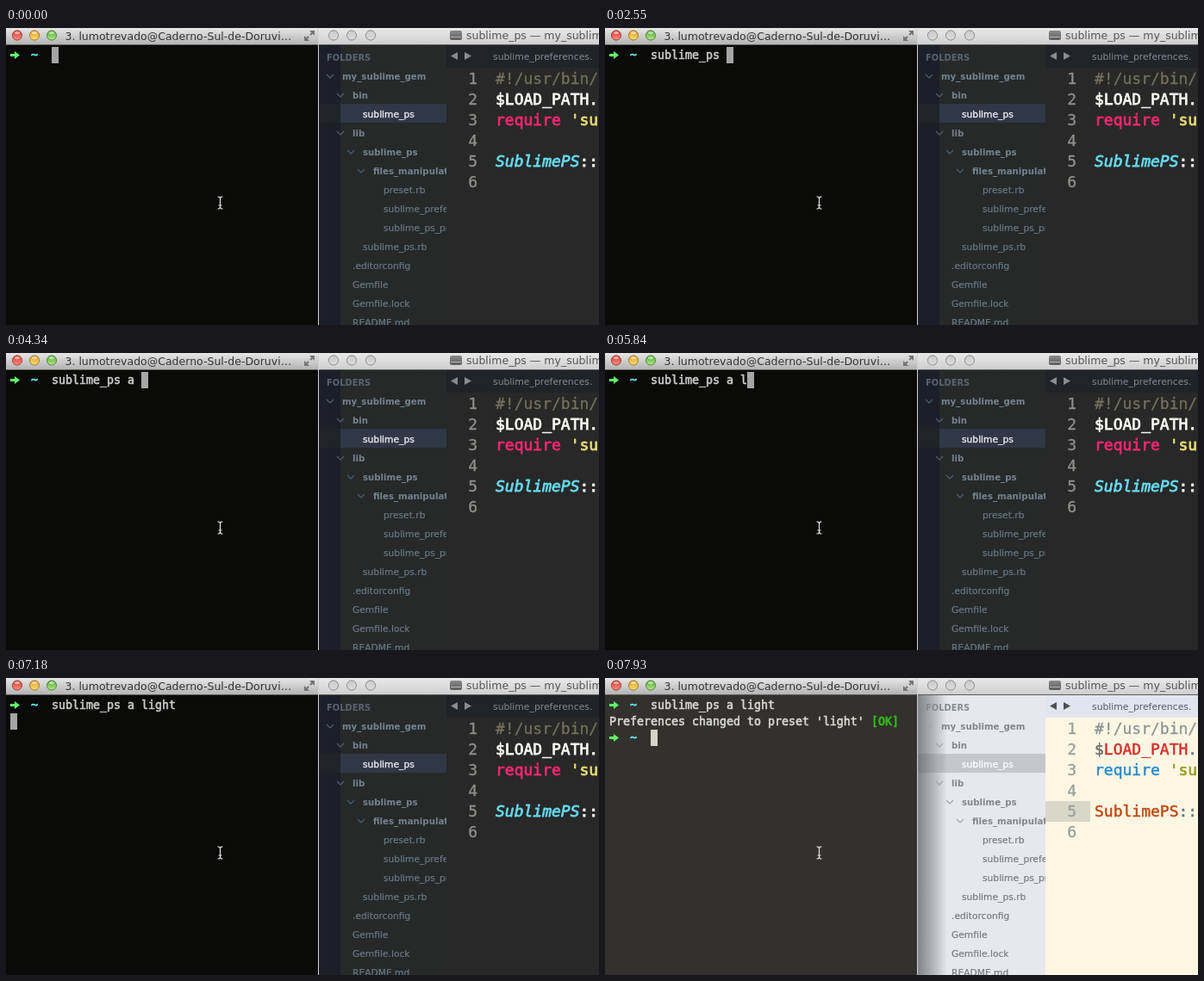
These frames come from a looping animation (688x345 px, 8 s). An HTML page with a canvas:

```html
<!DOCTYPE html>
<html lang="en">
<head>
<meta charset="utf-8">
<title>Preset switch</title>
<style>
  html, body { margin: 0; width: 100%; height: 100%; overflow: hidden; background: #0a0a08; }
  canvas { display: block; }
</style>
</head>
<body>
<canvas id="stage" width="688" height="345"></canvas>
<script>
const ctx = document.getElementById('stage').getContext('2d');
const W = 688, H = 345, LOOP = 8000;
const SANS = '"DejaVu Sans", sans-serif';
const MONO = '"DejaVu Sans Mono", monospace';
const TERM = '13.29px ' + MONO;
const CODE = '18px ' + MONO;
const COL = 8, ROW = 19;

const COMMAND = 'sublime_ps a light';
// [time, typed characters]
const KEYS = [[0, 0], [1500, 1], [1650, 2], [2100, 4], [2250, 5], [2400, 6], [2550, 11],
  [4040, 12], [4340, 13], [5840, 14], [5990, 15], [6290, 16], [6580, 18]];
const ENTER = 7180, BUSY = 7330, DONE = 7780, LIGHT = 7930;

const THEMES = {
  dark: {
    term: '#0a0a08', termText: '#c9c9c9', cursor: '#a5a5a5',
    edge: '#1c1f28', side: '#262928', row: '#303747', rowEdge: '#20242a', shadow: null,
    sideText: '#697986', folder: '#74838f', head: '#59646f', picked: '#e6e9ee', chevron: '#4d6077',
    tabs: '#202328', tabText: '#808b96', arrow: '#898d92',
    editor: '#272827', num: '#90918c', band: null,
    comment: '#75715e', sigil: '#f8f8f2', variable: '#f8f8f2', keyword: '#f92672',
    string: '#e6db74', type: '#66d9ef', plain: '#f8f8f2', italic: 'italic ', heft: 0.8
  },
  light: {
    term: '#33312d', termText: '#d6d6d3', cursor: '#d6d4ca',
    edge: '#e4e7ef', side: '#e6e8ee', row: '#c3c6cc', rowEdge: '#c9ccd3', shadow: '70,70,72',
    sideText: '#777b81', folder: '#83868c', head: '#858a92', picked: '#fafbfd', chevron: '#a0a4ab',
    tabs: '#e1e5ed', tabText: '#555b64', arrow: '#4c5056',
    editor: '#fdf6e3', num: '#98a19c', band: '#d9d7c8',
    comment: '#8a9494', sigil: '#6b6f70', variable: '#d3302d', keyword: '#268bd2',
    string: '#8f9a12', type: '#c04a14', plain: '#657b83', italic: '', heft: 0.5
  }
};

// [label, x, kind]
const TREE = [
  ['my_sublime_gem', 390, 'folder'], ['bin', 402, 'folder'], ['sublime_ps', 414, 'picked'],
  ['lib', 402, 'folder'], ['sublime_ps', 414, 'folder'], ['files_manipulator', 426, 'folder'],
  ['preset.rb', 438], ['sublime_preferences.rb', 438], ['sublime_ps_preset.rb', 438],
  ['sublime_ps.rb', 414], ['.editorconfig', 402], ['Gemfile', 402],
  ['Gemfile.lock', 402], ['README.md', 402]
];

const LINES = [
  [['#!/usr/bin/', 'comment']],
  [['$', 'sigil'], ['LOAD_PATH', 'variable'], ['.', 'plain']],
  [['require ', 'keyword'], ["'su", 'string']],
  [],
  [['SublimePS', 'type'], ['::', 'plain']],
  []
];

function rect(x, y, w, h, fill) {
  ctx.fillStyle = fill;
  ctx.fillRect(x, y, w, h);
}

// heft thickens the strokes of the letters between regular and bold
function text(str, x, y, font, color, heft = 0, align = 'left') {
  ctx.font = font;
  ctx.fillStyle = ctx.strokeStyle = color;
  ctx.textAlign = align;
  ctx.fillText(str, x, y);
  if (heft) {
    ctx.lineWidth = heft;
    ctx.lineJoin = 'round';
    ctx.strokeText(str, x, y);
  }
}

function line(points, color, width) {
  ctx.beginPath();
  points.forEach(([x, y], i) => i ? ctx.lineTo(x, y) : ctx.moveTo(x, y));
  ctx.strokeStyle = color;
  ctx.lineWidth = width;
  ctx.stroke();
}

function poly(points, fill) {
  ctx.beginPath();
  points.forEach(([x, y]) => ctx.lineTo(x, y));
  ctx.fillStyle = fill;
  ctx.fill();
}

function clip(x, y, w, h, paint) {
  ctx.save();
  ctx.beginPath();
  ctx.rect(x, y, w, h);
  ctx.clip();
  paint();
  ctx.restore();
}

function gradient(x0, y0, x1, y1, ...stops) {
  const g = ctx.createLinearGradient(x0, y0, x1, y1);
  stops.forEach((c, i) => g.addColorStop(i / (stops.length - 1), c));
  return g;
}

function titleBar(x, w, top, bottom) {
  rect(x, 0, w, 19, gradient(0, 0, 0, 19, top, bottom));
  rect(x, 19, w, 1, '#5c5c5c');
}

function button(x, light, dark, rim) {
  ctx.beginPath();
  ctx.arc(x, 8.5, 5.6, 0, Math.PI * 2);
  ctx.fillStyle = gradient(0, 3, 0, 14, dark, light);
  ctx.fill();
  ctx.strokeStyle = rim;
  ctx.lineWidth = 1;
  ctx.stroke();
}

function shine(x) {
  ctx.beginPath();
  ctx.ellipse(x, 5.6, 3, 1.7, 0, 0, Math.PI * 2);
  ctx.fillStyle = 'rgba(255,255,255,.55)';
  ctx.fill();
}

function resizeIcon() {
  const c = '#747474';
  poly([[358, 3], [358, 9], [352, 3]], c);
  poly([[346, 15], [346, 9], [352, 15]], c);
  line([[356, 5], [353, 8]], c, 2);
  line([[348, 13], [351, 10]], c, 2);
}

function prompt(row) {
  const y = 31.5 + row * ROW;
  poly([[5, y - 1.5], [10, y - 1.5], [10, y - 4.5], [16, y], [10, y + 4.5],
    [10, y + 1.5], [5, y + 1.5]], '#5ffa68');
  text('~', 29, 36 + row * ROW, TERM, '#5ff5fa', 0.6);
}

function beam(x, y) {
  const c = '#e4e4e2';
  for (const s of [-1, 1])
    line([[x - 3, y + s * 7], [x - 1.5, y + s * 7], [x, y + s * 5.5],
      [x + 1.5, y + s * 7], [x + 3, y + s * 7]], c, 1.2);
  line([[x, y - 5.5], [x, y + 5.5]], c, 1.2);
  line([[x - 2, y + 3], [x + 2, y + 3]], c, 1);
}

function terminal(t, th) {
  rect(0, 19, 362, H - 19, th.term);
  titleBar(0, 362, '#e6e6e6', '#b4b4b4');
  button(13, '#ff8d80', '#d8392f', '#99413a');
  button(33, '#ffdc74', '#e09a20', '#a17a32');
  button(53, '#b5e888', '#4ea832', '#558342');
  [13, 33, 53].forEach(shine);
  resizeIcon();
  const font = '12.5px ' + SANS;
  if (t >= BUSY && t < DONE) text('3. ' + COMMAND, 181, 13.5, font, '#333', 0, 'center');
  else text('3. lumotrevado@Caderno-Sul-de-Doruvi…', 68.5, 13.5, font, '#333');

  const typed = KEYS.filter(k => k[0] <= t).pop()[1];
  prompt(0);
  text(COMMAND.slice(0, typed), 53, 36, TERM, th.termText, 0.6);

  let col = 6 + typed, row = 0;
  if (t >= DONE) {
    text("Preferences changed to preset 'light' ", 5, 55, TERM, th.termText, 0.6);
    text('[OK]', 5 + 38 * COL, 55, TERM, '#2fc414', 0.6);
    prompt(2);
    col = 6;
    row = 2;
  } else if (t >= ENTER) {
    col = 0;
    row = 1;
  }
  rect(5 + col * COL, 22 + row * ROW, COL, ROW, th.cursor);
  beam(248.5, 203);
}

function sidebar(th) {
  rect(363, 19, 148, H - 19, th.side);
  rect(363, 19, 25, H - 19, th.edge);
  rect(363, 88, 148, 22, th.row);
  rect(363, 88, 25, 22, th.rowEdge);
  if (th.shadow) {
    const [deep, mid, none] = [0.62, 0.32, 0].map(a => `rgba(${th.shadow},${a})`);
    rect(363, 19, 34, H - 19, gradient(363, 0, 397, 0, deep, mid, none));
  }
  text('FOLDERS', 372, 38, 'bold 9.9px ' + SANS, th.head);
  clip(363, 19, 148, H - 19, () => TREE.forEach(([label, x, kind], i) => {
    const y = 56 + i * 22;
    const folder = kind === 'folder';
    const heft = kind === 'picked' ? 0.4 : 0.2;
    text(label, x, y + 3.5, (folder ? 'bold 10.2px ' : '10.7px ') + SANS,
      th[kind || 'sideText'], folder ? 0 : heft);
    if (folder) line([[x - 18, y - 2], [x - 14, y + 2], [x - 10, y - 2]], th.chevron, 1.1);
  }));
}

function editor(th) {
  rect(511, 19, W - 511, H - 19, th.editor);
  rect(511, 19, W - 511, 27, th.tabs);
  poly([[516, 32.5], [524, 28], [524, 37]], th.arrow);
  poly([[540, 32.5], [532, 28], [532, 37]], th.arrow);
  text('sublime_preferences.', 565, 37, '10.8px ' + SANS, th.tabText);
  if (th.band) rect(511, 143, 52, 24, th.band);
  LINES.forEach((parts, i) => {
    const y = 65 + i * 24;
    text(i + 1, 547, y, CODE, th.num, 0.3, 'right');
    let x = 568;
    for (const [str, kind] of parts) {
      const heft = kind === 'comment' ? 0.3 : th.heft;
      text(str, x, y, (kind === 'type' ? th.italic : '') + CODE, th[kind], heft);
      x += ctx.measureText(str).width;
    }
  });
}

function editorTitle() {
  titleBar(363, W - 363, '#e9e9e9', '#cfcfcf');
  for (const x of [380, 401, 423]) button(x, '#dcdcdc', '#cacaca', '#8c8c8c');
  ctx.beginPath();
  ctx.roundRect(515, 3, 14, 11, 2);
  ctx.fillStyle = gradient(0, 3, 0, 14, '#8a8a8a', '#5d5d5d');
  ctx.fill();
  rect(516, 10, 12, 1, '#b5b5b5');
  text('sublime_ps — my_sublime_gem', 534, 13, '12.5px ' + SANS, '#555');
}

function draw(t) {
  const th = t >= LIGHT ? THEMES.light : THEMES.dark;
  sidebar(th);
  editor(th);
  editorTitle();
  terminal(t, th);
  rect(362, 0, 1, H, '#d2d2d2');
}

const start = performance.now();
function tick() {
  draw((performance.now() - start) % LOOP);
  requestAnimationFrame(tick);
}
tick();
</script>
</body>
</html>
```
